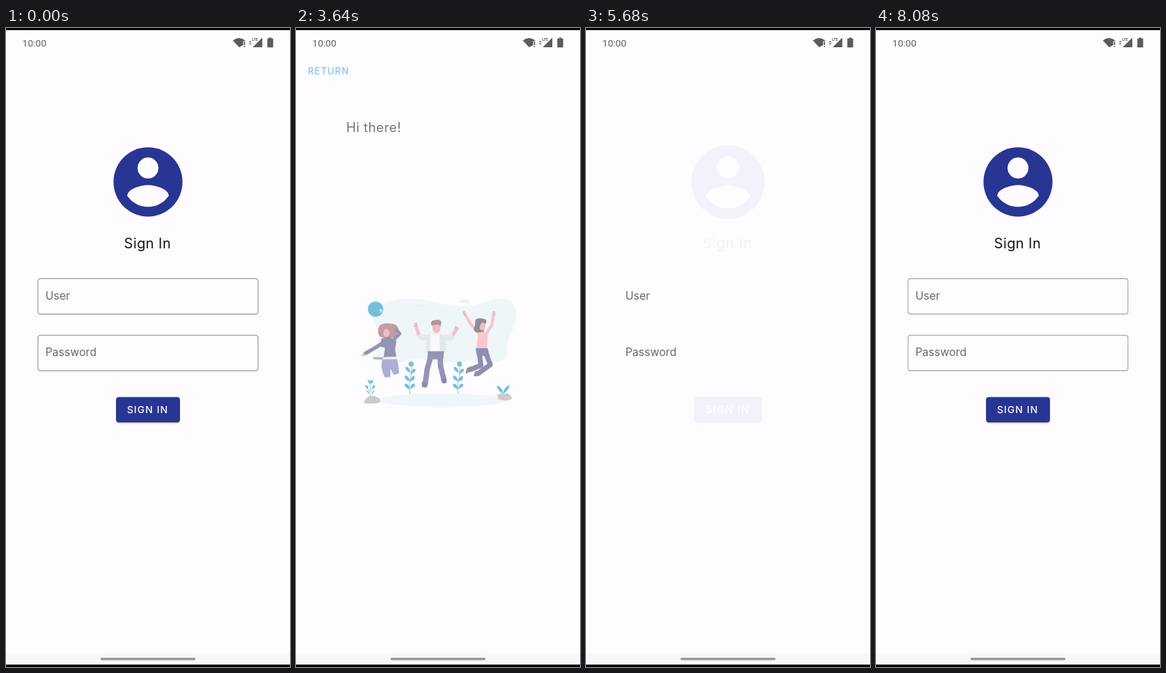
An HTML page for the animation above (8.12 s loop, 400 px wide and 896 px high).

```html
<!DOCTYPE html>
<html lang="en">
<head>
<meta charset="utf-8">
<title>Sign in</title>
<style>
html, body { margin: 0; width: 100%; height: 100%; overflow: hidden; background: #fefcff; }
svg { display: block; width: 100%; height: 100%; }
text { font-family: Inter, "Open Sans", sans-serif; white-space: pre; }
.title { font-size: 19.5px; letter-spacing: .45px; fill: #141416; }
.btn { font-size: 13.6px; font-weight: 500; letter-spacing: 1.1px; }
.hint { font-size: 15.5px; letter-spacing: .05px; fill: #686868; }
.field { fill: none; stroke: #979797; stroke-width: 1.2; }
.line { fill: none; stroke-linecap: round; stroke-linejoin: round; }
.teal { fill: #1596b6; }
.skin { fill: #e78f9b; }
.pale { fill: #e5f2f5; }
</style>
</head>
<body>
<svg viewBox="0 0 400 896">
  <defs>
    <filter id="blur" x="-20%" y="-40%" width="140%" height="200%"><feGaussianBlur stdDeviation="1.3"/></filter>
    <clipPath id="signClip"><rect x="155" y="517.6" width="90" height="35.4" rx="4"/></clipPath>
    <clipPath id="returnClip"><rect x="5" y="42.5" width="83.5" height="35.5" rx="4"/></clipPath>
    <clipPath id="fieldClip"><path d="M44.4 350.8h311.2v51H44.4zM44.4 430.2h311.2v51H44.4z"/></clipPath>
    <g id="plant">
      <path class="line" d="M158 516Q156 505 159 494T160 470" stroke="#54606f" stroke-width=".8"/>
      <g class="teal">
        <circle cx="160" cy="472" r="3.8"/>
        <path id="leaf" d="M159 487Q161 478 166 479Q169 484 159 487z"/>
        <use href="#leaf" x="-1" y="11"/>
        <use href="#leaf" x="-1" y="22"/>
        <path id="leafL" d="M159 485Q158 476 152 476Q149 481 159 485z"/>
        <use href="#leafL" x="-1" y="13"/>
        <use href="#leafL" x="-1" y="25"/>
      </g>
    </g>
  </defs>

  <rect width="400" height="896" fill="#fefcff"/>
  <rect y="877" width="400" height="16" fill="#f8f7fa"/>
  <rect width="400" height="3"/>
  <rect y="892.6" width="400" height="4"/>
  <rect x="133" y="883" width="134" height="3.6" rx="1.8" fill="#9b9b9c"/>

  <g fill="#5c5c5d">
    <text x="23" y="25.5" style="font:13.6px Roboto,sans-serif">10:00</text>
    <path d="M319.5 17.5Q328.3 10.5 337 17.5L334 21V24L328.3 27z"/>
    <path d="M334 18.5h3.5v9H334z" fill="#fefcff"/>
    <path d="M335 19h1.6v5H335zM335 25.2h1.6v1.6H335zM342 20l2-2 2 2zM342 21.5l2 2 2-2z"/>
    <path d="M347.5 27L361 13.5V27z"/>
    <path d="M346 12.5h9.5v6.5H346z" fill="#fefcff"/>
    <text x="346.6" y="18" style="font:bold 5px Roboto,sans-serif">LTE</text>
    <path d="M370.3 13.5h3.7v1.3h2.3v12.4h-8.2V14.8h2.2z"/>
  </g>

  <g id="login">
    <g data-c="200 215.8">
      <circle cx="200" cy="215.8" r="48.6" fill="#283593"/>
      <circle cx="200" cy="196.3" r="14.7" fill="#fefcff"/>
      <path d="M200 250.8C187.8 250.8 177.1 244.6 170.8 235.2C171 225.5 190.3 220.2 200 220.2S229 225.5 229.2 235.2C222.9 244.6 212.2 250.8 200 250.8z" fill="#fefcff"/>
    </g>
    <g data-c="200 302"><text class="title" x="166.3" y="309">Sign In</text></g>
    <g id="fields">
      <g data-c="200 376.3"><rect class="field" x="45" y="351.4" width="310" height="49.8" rx="3.6"/></g>
      <g data-c="200 455.7"><rect class="field" x="45" y="430.8" width="310" height="49.8" rx="3.6"/></g>
    </g>
    <g data-c="200 535.3">
      <rect id="shadow" x="155.5" y="519.5" width="89" height="34.6" rx="4" filter="url(#blur)"/>
      <rect x="155" y="517.6" width="90" height="35.4" rx="4" fill="#283593"/>
      <g clip-path="url(#signClip)"><circle id="signRipple" cx="200" cy="535.3" fill="#fff"/></g>
      <text class="btn" x="170.4" y="540.2" fill="#fff">SIGN IN</text>
    </g>
  </g>
  <g id="hints">
    <text class="hint" x="55.4" y="381">User</text>
    <text class="hint" x="55.4" y="460.3">Password</text>
  </g>

  <g id="home">
    <g data-c="46.8 60.3">
      <g clip-path="url(#returnClip)"><circle id="returnRipple" cx="46.8" cy="60.3" fill="#2a9fe0"/></g>
      <text class="btn" x="15" y="65.2" fill="#2a9fe0">RETURN</text>
    </g>
    <g data-c="111.5 139"><text class="title" x="68.4" y="146">Hi there!</text></g>

    <g data-c="200 457">
      <path class="pale" d="M103 405C102 382 130 375 158 375C190 375 215 389 245 386C266 384 278 374 298 375C316 377 319 393 314 412C310 430 301 436 303 452C304 467 288 471 268 469C240 465 222 472 200 470C180 468 170 462 156 466C136 474 112 474 108 456C106 442 113 438 112 427C111 418 104 416 103 405z"/>
      <ellipse class="pale" cx="207" cy="525.5" rx="98" ry="9.7"/>
      <path d="M233 381q-1-4 4-4 5-3 9 0 4 4-1 5z" fill="#e9e9ec"/>
      <path d="M166 387q1-4 5-3 6-1 6 3z" fill="#dceaee"/>

      <circle cx="107" cy="390.5" r="11.4" fill="#0c97bd"/>
      <path d="M112 391l5-1 1 4-4 3z" fill="#79c7dc"/>

      <!-- left dancer -->
      <path d="M111 424C109 413 120 410 129 412C140 412 144 421 138 425C142 431 132 435 126 432C117 435 110 431 111 424z" fill="#965761"/>
      <path class="line" d="M133 437L143 427L138 421" stroke="#48497b" stroke-width="5"/>
      <ellipse class="skin" cx="123" cy="426" rx="4.6" ry="6.2"/>
      <path class="line" d="M117 441Q107 448 92 456" stroke="#48497b" stroke-width="5.6"/>
      <circle class="skin" cx="88.5" cy="458.5" r="2.3"/>
      <path d="M116 434L127 431L138 438L136 450L138 461L119 462L121 448L113 446z" fill="#48497b"/>
      <path d="M119 462H138L139 467H117z" fill="#f4dfe3"/>
      <path d="M103 461.5L119 462L117 465.5L104 465z" fill="#777ab5"/>
      <path d="M117 465L139 465Q142 475 142 486L134 488L129 479L129 491L121 492Q113 479 117 465z" fill="#7077b4"/>

      <!-- middle dancer -->
      <path class="line" d="M172 431L167 415" stroke="#ee939f" stroke-width="5"/>
      <path class="line" d="M221 431L228 419" stroke="#ee939f" stroke-width="5"/>
      <path class="skin" d="M163.5 417L165 410.5L169 411L170 417zM224 419L226 415L230 418L230 423z"/>
      <path d="M190 427L184 429L174 427L169 431Q173 439 183 437L182 455H212L211 437Q220 440 225 432L219 428L207 429L202 426z" fill="#d4d9dd"/>
      <path d="M189 428L202 427L203 455H188z" fill="#f4f6f9"/>
      <path class="skin" d="M191 411H203.5V422Q197 430 192 422z"/>
      <path d="M190 415Q188 407 195 407Q205 405 205 411L204 416L200 413z" fill="#7d4752"/>
      <path class="line" d="M190 458L184 479L181 501M203 458L204 476L209 496" stroke="#4a4882" stroke-width="8"/>
      <path d="M185 453H209L208 465H184z" fill="#4a4882"/>
      <path d="M176 498L185 501L183 507L176 506zM204 494L212 493L213 500L207 501z" fill="#39366b"/>

      <!-- right dancer -->
      <path class="line" d="M262 428L249 413L240 398M271 428L280 415L283 398" stroke="#f79daa" stroke-width="4.6"/>
      <path class="skin" d="M236 394L240 393L243 400L239 401zM281 394L285 393L286 400L281 400z"/>
      <path d="M256 406Q263 402 271 406Q274 409 270 413L268 425L257 425Q251 421 255 416z" fill="#403d47"/>
      <ellipse class="skin" cx="266" cy="416" rx="4.5" ry="6.2"/>
      <path d="M256 407Q265 402 271 408L264 412L260 423L255 421z" fill="#403d47"/>
      <path d="M260 427L266 424L274 428L273 450L257 450z" fill="#f9a1ad"/>
      <path class="line" d="M261 452L264 474L249 480M270 452L278 473L260 486" stroke="#403f78" stroke-width="7.4"/>
      <path d="M256 448.5H274L277 460H258z" fill="#403f78"/>
      <path d="M243 478L250 475L249 483L241 487zM255 483L261 482L260 490L253 490z" fill="#47454d"/>

      <!-- plants and stones -->
      <use href="#plant"/>
      <use href="#plant" x="72"/>
      <path class="line" d="M99 521V500M99 514L93 506M99 512L105 505" stroke="#7fc4d4" stroke-width="1.2"/>
      <path class="teal" d="M95 495l4 2 5-2-2 6h-5zM92 503l4 2v4l-4-2zM106 503l-4 2v4l4-2zM93 511l4 2v4zM106 511l-4 2v4z"/>
      <path class="teal" d="M287 504Q296 505 297 516Q289 512 287 504zM307 503Q298 506 297 516Q305 512 307 503z"/>
      <path d="M89.5 530Q90 525 95 521Q102 517 109 521Q114 522 114 529Q105 532 89.5 530z" fill="#a8a7aa"/>
      <path d="M288 518Q292 514 299 516Q308 513 310 524Q300 528 290 524z" fill="#a8a7aa"/>
    </g>
  </g>
</svg>
<script>
const LOOP = 8120, SPAN = 3000, FORWARD = 2250, BACK = 4766;
const $ = id => document.getElementById(id);
const clamp = v => Math.max(0, Math.min(1, v));

// cubic-bezier(.4, 0, .2, 1)
function ease(x) {
  if (x <= 0 || x >= 1) return clamp(x);
  let lo = 0, hi = 1, u;
  for (let i = 0; i < 24; i++) {
    u = (lo + hi) / 2;
    const v = 1 - u;
    if (1.2 * v * v * u + .6 * v * u * u + u * u * u < x) lo = u; else hi = u;
  }
  return u * u * (3 - 2 * u);
}

const fadeOut = p => clamp(1 - p / .35);
const fadeIn = p => clamp((p - .35) / .65);

// Every view scales around its own centre.
function pose(id, scale, alpha) {
  $(id).style.display = alpha ? "" : "none";
  for (const el of $(id).querySelectorAll("[data-c]")) {
    const [x, y] = el.dataset.c.split(" ");
    el.setAttribute("transform", `translate(${x} ${y}) scale(${scale}) translate(${-x} ${-y})`);
    el.setAttribute("opacity", alpha);
  }
}

function ripple(id, t, press, release, strength) {
  const grow = clamp((t - press) / 200);
  const alpha = clamp((t - press) / 75) * clamp(1 - (t - release) / 150);
  $(id).setAttribute("r", 12 + 38 * grow);
  $(id).setAttribute("opacity", alpha * strength);
}

function draw(t) {
  const back = t >= BACK;
  const p = ease((t - (back ? BACK : FORWARD)) / SPAN);
  const depth = back ? 1 - p : p;
  pose("login", 1 + .1 * depth, back ? fadeIn(p) : fadeOut(p));
  pose("home", .8 + .2 * depth, back ? fadeOut(p) : fadeIn(p));

  const moving = !back && t >= FORWARD;
  $("hints").style.display = moving ? "none" : "";
  if (back) $("fields").setAttribute("clip-path", "url(#fieldClip)");
  else $("fields").removeAttribute("clip-path");
  $("shadow").setAttribute("opacity", moving ? 0 : .3 + .15 * clamp((t - 2160) / 100) * !back);

  ripple("signRipple", t, 2150, FORWARD, .24);
  ripple("returnRipple", t, 4520, BACK, .14);
}

const start = performance.now();
function tick() {
  draw((performance.now() - start) % LOOP);
  requestAnimationFrame(tick);
}
tick();
</script>
</body>
</html>
```
